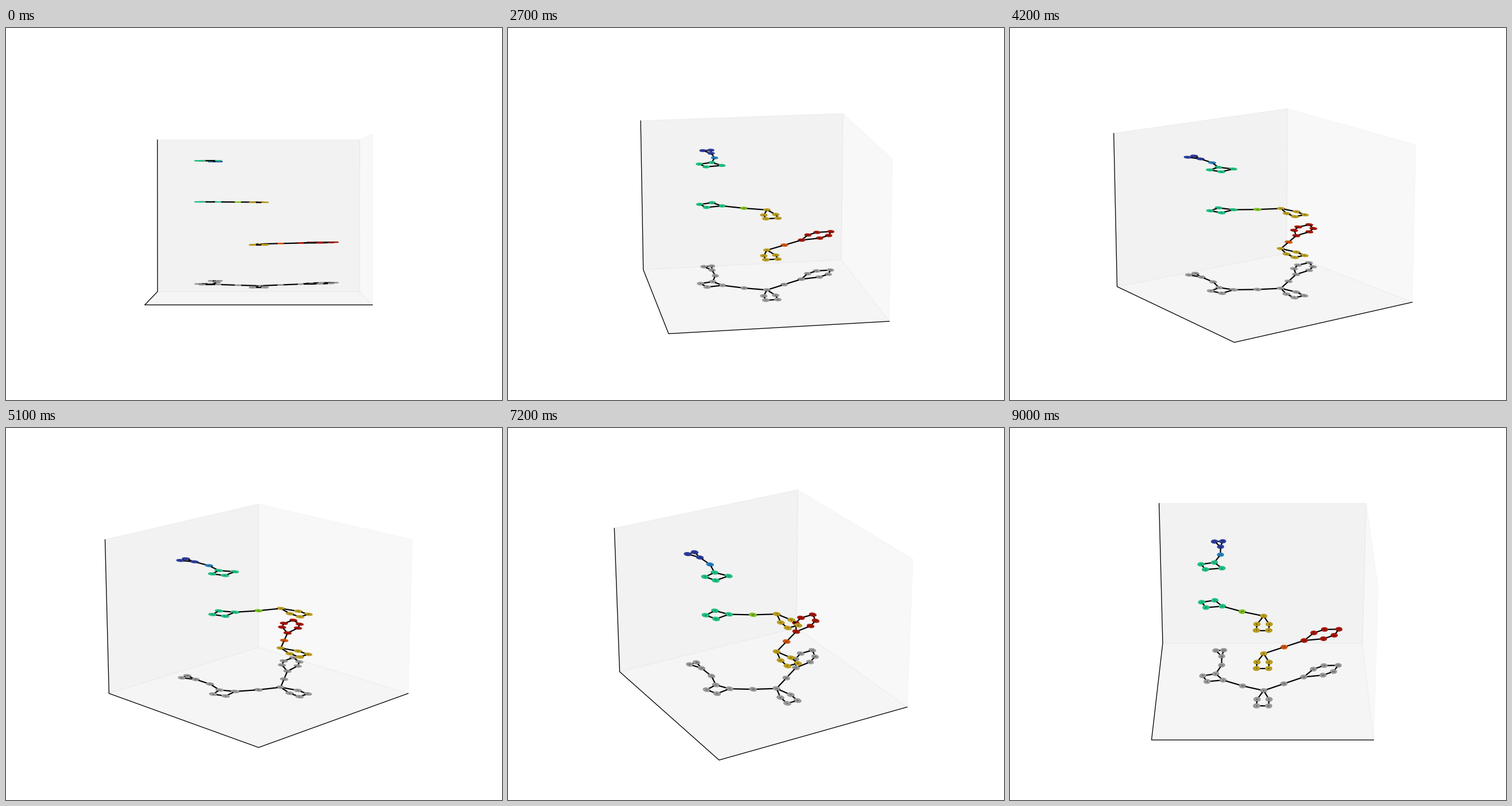
Animation, 864 px wide and 648 px high, one loop 9300 ms. Source, as a matplotlib script:

```python
import numpy as np
import matplotlib.pyplot as plt
from matplotlib.animation import FuncAnimation
from matplotlib.patches import PathPatch, Polygon
from matplotlib.path import Path
from matplotlib.textpath import TextPath

W, H = 864, 648
FRAMES, INTERVAL = 31, 300
CX, CY = 440, 330.2          # screen position of the box centre
FOCAL, DIST = 3136, 10
BOX = np.array([4, 4, 3]) * 0.1488
RADII = np.array([0.0168, 0.0225])   # node radii on the layer plane
FLOOR_Z, LAYER_GAP = -0.37, 0.2285
GREY = "#999999"


def camera(i):
    """Elevation and turn in radians: tilt, turn, tilt, turn back."""
    elev = 1 + 2 * np.clip(i, 0, 7) + 2 * np.clip(i - 16, 0, 5)
    turn = 5 * np.clip(i - 7, 0, 9) - 5 * np.clip(i - 21, 0, 9)
    return np.radians(elev), np.radians(turn)


def project(pts, elev, turn):
    """Return screen points and their depth."""
    x, y, z = np.asarray(pts).T
    right = x * np.cos(turn) - y * np.sin(turn)
    back = x * np.sin(turn) + y * np.cos(turn)
    up = z * np.cos(elev) + back * np.sin(elev)
    depth = DIST + back * np.cos(elev) - z * np.sin(elev)
    k = FOCAL / depth
    return np.column_stack([CX + right * k, CY - up * k]), depth


def lift(xy, z):
    return np.column_stack([xy, np.full(len(xy), z)])


class Graph:
    """Rings of nodes joined through single linker nodes."""

    def __init__(self):
        self.pos, self.colors, self.edges = [], [], []

    def add(self, xy, color):
        self.pos.append(np.array(xy))
        self.colors.append(color)
        return len(self.pos) - 1

    def ring(self, n, start, axis, side, color):
        """Run out along the axis on one side and back on the other."""
        ids = []
        for k in range(n):
            level = (min(k, n - k) / (n // 2)) ** 0.8
            turn = 0 if 2 * k % n == 0 else np.sign(n - 2 * k)
            xy = np.array(start) + level * np.array(axis)
            ids.append(self.add(xy + turn * np.array(side), color))
        self.edges += [(ids[k - 1], ids[k]) for k in range(n)]
        return ids

    def link(self, a, b, bend, color):
        """Put a node midway between a and b, pushed sideways by bend."""
        dx, dy = self.pos[b] - self.pos[a]
        mid = (self.pos[a] + self.pos[b]) / 2
        n = self.add(mid + bend * np.array([dy, -dx]), color)
        self.edges += [(a, n), (n, b)]
        return n


g = Graph()
green = g.ring(4, (-.222, -.039), (-.116, .054), (.023, .048), "#1fbf80")
yellow = g.ring(5, (.006, -.167), (-.006, -.182), (-.033, 0), "#b99d22")
red = g.ring(6, (.232, .000), (.200, .147), (-.026, .038), "#a7190a")
blue = g.ring(3, (-.236, .264), (-.013, .078), (-.023, -.002), "#2f3f9f")
orange = g.link(yellow[0], red[0], 0, "#d2580f")
lime = g.link(green[0], yellow[0], .03, "#7fc224")
azure = g.link(green[1], blue[0], .075, "#2a84c0")

LAYERS = [
    range(len(g.pos)),
    yellow + [orange] + red,
    green + [lime] + yellow,
    green + [azure] + blue,
]

fig = plt.figure(figsize=(12, 9), dpi=72, facecolor="white")
ax = fig.add_axes([0, 0, 1, 1])
ax.set_xlim(0, W)
ax.set_ylim(H, 0)
ax.axis("off")

# Panes and axis lines
SQUARE = np.array([(-1, -1), (1, -1), (1, 1), (-1, 1)])
panes = []
for axis, sign, shade in [(0, 1, .95), (1, 1, .90), (2, -1, .925)]:
    patch = Polygon(SQUARE, color=(shade,) * 3 + (.5,), lw=1.4, zorder=-100)
    corners = np.insert(SQUARE, axis, sign, axis=1) * BOX
    panes.append((ax.add_patch(patch), corners))

FRAME = np.array([(-1, 1, 1), (-1, 1, -1), (-1, -1, -1), (1, -1, -1)]) * BOX
frame_line, = ax.plot([], [], color="black", lw=1.3, zorder=-99)

# Nodes, labels and edges
angle = np.linspace(0, 2 * np.pi, 40, endpoint=False)
DISC = np.column_stack([np.cos(angle), np.sin(angle)]) * RADII


def label_shape(text):
    path = TextPath((0, 0), text, size=1)
    box = path.get_extents()
    return (path.vertices - (box.p0 + box.p1) / 2) * RADII * .83, path.codes


discs, labels, edges = [], [], []
for level, members in enumerate(LAYERS):
    z = FLOOR_Z + level * LAYER_GAP
    for n in members:
        color = g.colors[n] if level else GREY
        disc = Polygon(DISC, color=color, lw=2, joinstyle="round")
        discs.append((ax.add_patch(disc), lift(g.pos[n] + DISC, z)))
        shape, codes = label_shape(str(n + 1))
        label = PathPatch(Path(shape, codes), facecolor="black", lw=0)
        labels.append((ax.add_patch(label), lift(g.pos[n] + shape, z), codes))
    for a, b in g.edges:
        if a in members and b in members:
            step = g.pos[b] - g.pos[a]
            trim = step / np.hypot(*(step / RADII))
            ends = np.array([g.pos[a] + trim, g.pos[b] - trim])
            line, = ax.plot([], [], color="black", lw=2.2,
                            solid_capstyle="butt")
            edges.append((line, lift(ends, z)))


def update(i):
    view = camera(i)
    for patch, corners in panes:
        patch.set_xy(project(corners, *view)[0])
    frame_line.set_data(*project(FRAME, *view)[0].T)

    # Nearer parts cover farther ones
    for (disc, rim), (label, pts, codes) in zip(discs, labels):
        xy, depth = project(rim, *view)
        disc.set_xy(xy)
        disc.set_zorder(-depth.min())
        label.set_path(Path(project(pts, *view)[0], codes))
        label.set_zorder(-depth.min() + 1e-6)
    for line, ends in edges:
        xy, depth = project(ends, *view)
        line.set_data(*xy.T)
        line.set_zorder(-depth.min())
    return []


anim = FuncAnimation(fig, update, frames=FRAMES, interval=INTERVAL,
                     repeat=True, repeat_delay=0, blit=False)
plt.show()
```
